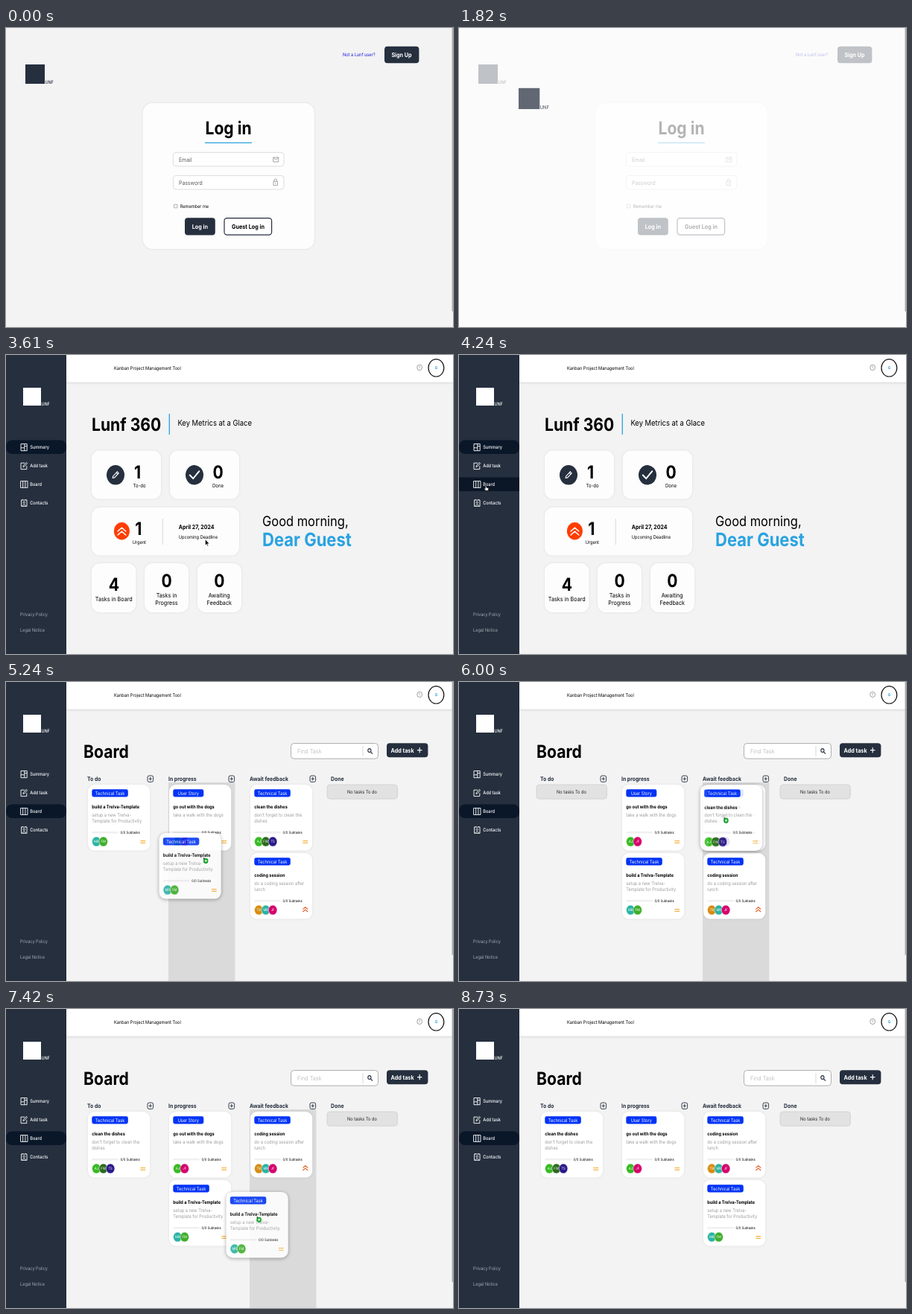
An HTML page that plays this animation: 600 by 402 pixels, repeating every 9.03 s.

```html
<!DOCTYPE html>
<html lang="en">
<head>
<meta charset="utf-8">
<title>Kanban demo</title>
<style>
  html, body { margin: 0; width: 100%; height: 100%; overflow: hidden; background: #f3f3f4; }
  svg { display: block; width: 100%; height: 100%; }
  text { font-family: Inter, Roboto, sans-serif; text-rendering: geometricPrecision; white-space: pre; }
  .card { filter: drop-shadow(0 0 1.5px rgba(0, 0, 0, .09)); }
  .ghost { filter: drop-shadow(0 1px 2.5px rgba(0, 0, 0, .38)); opacity: .88; }
</style>
</head>
<body>
<svg id="stage" viewBox="0 0 600 402" preserveAspectRatio="none"></svg>
<script>
const LOOP = 9030;
const SQUEEZE = 0.88;
const NAVY = '#252f3e', BLUE = '#29a3e0', BG = '#f3f3f4';

// --- drawing helpers ---
const each = (items, fn) => items.reduce((out, item, i) => out + fn(item, i), '');
const rect = (x, y, w, h, r, fill, extra = '') =>
  `<rect x="${x}" y="${y}" width="${w}" height="${h}" rx="${r}" fill="${fill}" ${extra}/>`;
const oval = (x, y, rx, ry, fill, extra = '') =>
  `<ellipse cx="${x}" cy="${y}" rx="${rx}" ry="${ry}" fill="${fill}" ${extra}/>`;
const line = (d, color, width = 1, extra = '') =>
  `<path d="${d}" fill="none" stroke="${color}" stroke-width="${width}" ${extra}/>`;
const text = (x, y, str, size, { fill = '#000', weight = 400, anchor = 'start' } = {}) =>
  `<text transform="translate(${x} ${y}) scale(${SQUEEZE} 1)" font-size="${size}" font-weight="${weight}" fill="${fill}" text-anchor="${anchor}">${str}</text>`;
const bold = (x, y, str, size, fill = '#000', anchor = 'start') =>
  text(x, y, str, size, { fill, weight: 700, anchor });
const mid = (x, y, str, size, fill = '#000') => text(x, y, str, size, { fill, anchor: 'middle' });
const group = (id, body) => `<g id="${id}">${body}</g>`;
const panel = (x, y, w, h, r) => rect(x, y, w, h, r, '#fdfdfd', 'class="card"');
const scrollbar = h => rect(598.6, 0, 1.4, h, 0, '#a9a9a9');

// --- login page ---
const logo = rect(26, 49, 26, 26, 0, NAVY) + text(52.4, 75.3, 'UNF', 6.2, { weight: 500, fill: NAVY });

const field = (y, label) =>
  rect(224.4, y, 148.6, 18.6, 4, '#fff', 'stroke="#d3d3d3" stroke-width=".8"') +
  text(232, y + 12.2, label, 7.8, { fill: '#5c5c5c' });

const login = rect(0, 0, 600, 402, 0, BG) + logo +
  text(452, 38.3, 'Not a Lunf user?', 6.35, { fill: '#1818d8' }) +
  rect(508, 24.8, 46.4, 22.4, 4, NAVY) + bold(531, 39, 'Sign Up', 8.2, '#fff', 'middle') +
  panel(183.8, 101, 230, 196, 13) +
  bold(298.5, 142.8, 'Log in', 24, '#000', 'middle') +
  line('M267 154.4H330', BLUE, 1.3) +
  field(167.3, 'Email') + field(198.4, 'Password') +
  line('M358.8 174h6.8v6h-6.8zl3.4 3.2 3.4-3.2', '#999', .9) +
  line('M359 206.2h5.4v5.4h-5.4zM360 206v-1.2a1.7 1.9 0 0 1 3.4 0v1.2M361.7 208.2v1.4', '#999', .9) +
  rect(225.5, 237.2, 4.4, 4.6, .6, '#fff', 'stroke="#777" stroke-width=".6"') +
  text(233.8, 241.9, 'Remember me', 6.35) +
  rect(240, 255.2, 40.8, 23.4, 4, NAVY) + bold(260.3, 270, 'Log in', 8.2, '#fff', 'middle') +
  rect(293, 255.7, 63.6, 22.4, 3.6, '#fff', `stroke="${NAVY}" stroke-width="1.2"`) +
  bold(325, 270, 'Guest Log in', 8.2, '#000', 'middle');

// --- sidebar and header ---
const NAV = [
  ['Summary', 124, 'M20 119.5h8.2v9.2H20zM24.8 119.5v9.2M20 124.8h4.8M24.8 122.6h3.4'],
  ['Add task', 149, 'M25 145.2h-5v8.4h7.8v-4.4M23 150.6l.3-1.8 4-4.4 1.2 1.3-4 4.4z'],
  ['Board', 174, 'M19.6 169.6h9.4v8.8h-9.4zM22.7 169.6v8.8M25.9 169.6v8.8'],
  ['Contacts', 199, 'M20.6 195h7.4v8.4h-7.4zM22 203.2c.4-2.6 4.2-2.6 4.6 0M24.3 197a1.2 1.3 0 1 1-.1 0M22 194v1M26.6 194v1'],
];
const shell = rect(0, 0, 81, 402, 0, NAVY) +
  rect(23, 44, 24, 24, 0, '#fff') + text(47.4, 68.3, 'UNF', 6.2, { weight: 500, fill: '#fff' }) +
  '<rect id="hover" width="81" height="18.6" fill="#0b1626"/>' +
  '<rect id="active" width="81" height="18.6" rx="8" fill="#091729"/>' +
  each(NAV, ([name, y, icon]) =>
    line(icon, '#fff', .9) + text(32.2, y + 2.3, name, 6.4, { fill: '#fff', weight: 500 })) +
  text(19, 350.6, 'Privacy Policy', 6.35, { fill: '#a5a9b0' }) +
  text(19, 371.6, 'Legal Notice', 6.35, { fill: '#a5a9b0' }) +
  rect(81, 0, 519, 36.6, 0, '#fff', 'style="filter:drop-shadow(0 1px 1.5px rgba(0,0,0,.13))"') +
  text(145, 19.8, 'Kanban Project Management Tool', 6.4) +
  oval(555.2, 16.8, 3.4, 3.7, 'none', 'stroke="#777" stroke-width=".7"') +
  mid(555.2, 18.8, '?', 5.4, '#777') +
  oval(577.4, 17.3, 10.4, 11.7, '#fff', 'stroke="#111" stroke-width="1.2"') +
  bold(577.4, 19.3, 'G', 5.4, BLUE, 'middle');

// --- summary page ---
const total = (x, y, n) => bold(x, y, n, 24, '#000', 'middle');
const PANELS = [[115, 128.5, 93, 65], [220, 128.5, 93, 65], [115, 205, 198, 64.5],
  [115, 280, 59.5, 66], [186, 280, 59, 66], [257, 280, 59, 66]];
const summary = bold(115, 101.5, 'Lunf 360', 24) +
  line('M219.3 79V107', BLUE, 1.3) +
  text(230.4, 95, 'Key Metrics at a Glace', 10.7) +
  each(PANELS, box => panel(...box, 11)) +
  oval(147, 161.3, 12, 13.2, NAVY) + line('M143.2 165.4l.5-2.5 5.6-6 1.9 2-5.6 6zM148 158.2l1.9 2', '#fff', 1.1) +
  oval(253, 161.3, 12, 13.2, NAVY) + line('M246.8 161.5l4.4 4.6 8-9.8', '#fff', 2, 'stroke-linecap="round"') +
  oval(155.4, 236.8, 10.5, 11.7, '#ff3d00') +
  line('M150 237l5.4-4.8 5.4 4.8M150 242l5.4-4.8 5.4 4.8', '#fff', 1.5, 'stroke-linecap="round"') +
  total(176.5, 166, '1') + text(170.6, 178.3, 'To-do', 6.8) +
  total(284.6, 166, '0') + text(277, 178.3, 'Done', 6.8) +
  total(177.8, 242, '1') + text(169.8, 254, 'Urgent', 6.4) +
  line('M210.3 220V255', '#d1d1d1', .8) +
  bold(231.8, 233.6, 'April 27, 2024', 8) + text(231.8, 247, 'Upcoming Deadline', 6.4) +
  total(145, 317, '4') + mid(144.8, 330.8, 'Tasks in Board', 8.2) +
  total(215.5, 312, '0') + mid(215.5, 326, 'Tasks in', 8.2) + mid(215.5, 335.6, 'Progress', 8.2) +
  total(286.3, 312, '0') + mid(286.3, 326, 'Awaiting', 8.2) + mid(286.3, 335.6, 'Feedback', 8.2) +
  text(344, 229.8, 'Good morning,', 18.7) + bold(344, 257, 'Dear Guest', 25, BLUE);

// --- board page ---
const COLUMNS = ['To do', 'In progress', 'Await feedback', 'Done'];
const LANE = 89.4;
const columnX = i => 109 + 109 * i;
const slot = ([col, row]) => [columnX(col) + 1, 138 + 92 * row];

const PEOPLE = { MR: '#2bb3a3', FM: '#3fae2a', AJ: '#36bb22', FW: '#2c6a1c', TS: '#2c1a8a', TB: '#d68c12', JF: '#d5006c' };
const CARDS = {
  template: ['Technical Task', 'build a Trelva-Template', ['setup a new Trelva-', 'Template for Productivity'], ['MR', 'FM']],
  dogs: ['User Story', 'go out with the dogs', ['take a walk with the dogs'], ['AJ', 'JF']],
  dishes: ['Technical Task', 'clean the dishes', ["don't forget to clean the", 'dishes'], ['AJ', 'FW', 'TS']],
  coding: ['Technical Task', 'coding session', ['do a coding session after', 'lunch'], ['TB', 'MR', 'JF'], true],
};
const CARD_IDS = Object.keys(CARDS);

function card([label, title, lines, people, urgent]) {
  const w = label === 'User Story' ? 41 : 48.5;
  return rect(0, 0, 83.2, 88.6, 9, '#fff') +
    rect(5.3, 6.3, w, 10.2, 2.4, '#0033f5') + mid(5.3 + w / 2, 13.7, label, 6.4, '#fff') +
    bold(5.3, 32.3, title, 6.35) +
    each(lines, (s, i) => text(5.3, 43.2 + 7.5 * i, s, 6.4, { fill: '#9b9b9b' })) +
    rect(5.3, 63, 35.5, 2.6, 1.3, '#f0f0f0') + text(43.6, 66, '0/0 Subtasks', 4.75) +
    each(people, (p, i) => oval(11.3 + 9.4 * i, 76.6, 5.8, 6.5, PEOPLE[p], 'stroke="#fff" stroke-width=".5"') +
      mid(11.3 + 9.4 * i, 78.4, p, 4.8, '#fff')) +
    (urgent ? line('M70.4 75.6l3.4-2.8 3.4 2.8M70.4 79l3.4-2.8 3.4 2.8', '#e5561c', 1.1)
            : line('M70.4 75.6h6.8M70.4 78.4h6.8', '#f5b443', 1.1));
}
const emptyBox = x => rect(x, 138, 94.4, 19.2, 4, '#e2e2e2', 'stroke="#cecece" stroke-width=".8"') +
  mid(x + 47, 150.3, 'No tasks To do', 6.4, '#222');
const addIcon = x => rect(x, 126, 7.6, 8.4, 2, 'none', `stroke="${NAVY}" stroke-width=".9"`) +
  line(`M${x + 1.7} 130.2h4.2m-2.1 -2.3v4.6`, NAVY, .9);

const board = bold(104, 101.5, 'Board', 24) +
  rect(382.5, 82.5, 117, 20.6, 4, '#fff', 'stroke="#a8a8a8" stroke-width=".9"') +
  text(391, 96, 'Find Task', 8.2, { fill: '#c2c2c2' }) +
  line('M479 86V100', '#cfcfcf', .8) +
  line('M490 92a2.1 2.4 0 1 1-4.2 0a2.1 2.4 0 1 1 4.2 0M489.5 93.8l2.5 2.8', NAVY, 1.1) +
  rect(511, 82.2, 55.4, 19, 4, NAVY) + bold(516.5, 94.7, 'Add task', 8.2, '#fff') +
  line('M552 91.6h6.4M555.2 88v7.2', '#fff', 1.1) +
  `<rect id="lane" y="135" width="${LANE}" height="267" fill="#dadada"/>` +
  each(COLUMNS, (name, i) => bold(columnX(i), 133, name, 7.8, NAVY) + (i < 3 ? addIcon(columnX(i) + 81) : '')) +
  emptyBox(431) + group('todoEmpty', emptyBox(104)) +
  each(CARD_IDS, id => `<use id="${id}" href="#${id}Art" class="card"/>`) +
  each(CARD_IDS, id => `<use id="${id}Ghost" href="#${id}Art" class="ghost"/>`) +
  scrollbar(367);

// --- pointers, tip at 0,0 ---
const arrow = '<path d="M0 0V8.2L1.9 6.5 3 9.2 4.2 8.7 3.1 6.1H5.5Z" fill="#000" stroke="#fff" stroke-width=".6"/>';
const POINTERS = {
  arrow,
  beam: line('M-1.4-3h1.1l.3.5.3-.5h1.1M0-2.6V2.6M-1.4 3h1.1l.3-.5.3.5h1.1', '#333', .8),
  hand: '<path d="M-.8 0q.8-.8 1.6 0v2.6l2.3.6q.8.4.6 1.4l-.6 2.4h-3.4L-2.6 3.8q.6-.8 1.8.4Z" fill="#fff" stroke="#000" stroke-width=".7"/>',
  copy: arrow + oval(3.2, 5.4, 3.2, 3.6, '#18a32c') + line('M1.5 5.4h3.4M3.2 3.5v3.8', '#fff', .9),
};

document.getElementById('stage').innerHTML =
  `<defs>${each(CARD_IDS, id => group(id + 'Art', card(CARDS[id])))}</defs>` +
  group('login', login + group('splash', rect(0, 0, 600, 402, 0, '#fff') + group('flyer', logo)) + scrollbar(381)) +
  group('app', rect(0, 0, 600, 402, 0, BG) + shell + group('summary', summary) + group('board', board)) +
  group('pointer', each(Object.keys(POINTERS), k => group('p-' + k, POINTERS[k])));

// --- timeline ---
const ENTER_APP = 3270, OPEN_BOARD = 4420;
const SPLASH = { show: 360, start: 1340, length: 1000, dx: 256, dy: 148, grow: 0.4 };

const PATH = [ // time, x, y
  [2390, 420, -12], [2760, 308, 218], [3030, 326, 266], [3380, 326, 266], [4180, 36, 175.5],
  [4480, 36, 175.5], [4840, 169.5, 170], [4920, 169.5, 170], [5240, 265, 235], [5500, 270, 247],
  [5860, 359.5, 180.5], [5960, 359.5, 180.5], [6450, 150.5, 194.5], [6620, 149, 197],
  [7060, 260, 262], [7160, 260, 262], [7560, 366, 284], [7850, 368, 286], [8670, 491, 17], [8730, 500, -12],
];
const POINTER_STEPS = [[0, 'arrow'], [2720, 'beam'], [2800, 'arrow'], [2940, 'hand'], [3300, 'arrow'],
  [4080, 'hand'], [4560, 'arrow'], [4960, 'copy'], [5500, 'arrow'], [6000, 'copy'], [6620, 'arrow'],
  [7200, 'copy'], [7720, 'arrow']];
const DRAGS = [
  { id: 'template', from: 4920, to: 5500 },
  { id: 'dishes', from: 5960, to: 6620 },
  { id: 'template', from: 7160, to: 7720 },
];
const HOMES = { // time, [column, row]
  template: [[0, [0, 0]], [5500, [1, 1]], [7720, [2, 1]]],
  dogs: [[0, [1, 0]]],
  dishes: [[0, [2, 0]], [6620, [0, 0]]],
  coding: [[0, [2, 1]], [6620, [2, 0]]],
};

const el = id => document.getElementById(id);
const show = (id, on) => { el(id).style.display = on ? '' : 'none'; };
const place = (id, x, y) => el(id).setAttribute('transform', `translate(${x} ${y})`);
const stepAt = (steps, t) => steps.filter(s => s[0] <= t).pop()[1];
const clamp = v => Math.min(1, Math.max(0, v));

function bezier(x1, y1, x2, y2) {
  const curve = (a, b, s) => 3 * a * s * (1 - s) ** 2 + 3 * b * s * s * (1 - s) + s ** 3;
  return x => {
    let lo = 0, hi = 1;
    for (let i = 0; i < 24; i++) {
      const m = (lo + hi) / 2;
      if (curve(x1, x2, m) < x) lo = m; else hi = m;
    }
    return curve(y1, y2, lo);
  };
}
const ease = bezier(.25, .1, .25, 1), easeIn = bezier(.42, 0, 1, 1);

function pointerAt(t) {
  const i = PATH.findIndex(p => p[0] > t);
  if (i < 1) return null;
  const [t0, x0, y0] = PATH[i - 1], [t1, x1, y1] = PATH[i];
  const u = (t - t0) / (t1 - t0), k = u * u * (3 - 2 * u);
  return [x0 + (x1 - x0) * k, y0 + (y1 - y0) * k];
}

function drawLogin(t) {
  show('splash', t >= SPLASH.show && t < SPLASH.start + SPLASH.length);
  const p = clamp((t - SPLASH.start) / SPLASH.length), left = 1 - ease(p);
  el('splash').setAttribute('opacity', 1 - easeIn(p));
  el('flyer').setAttribute('transform',
    `translate(${44 + SPLASH.dx * left} ${53 + SPLASH.dy * left}) scale(${1 + SPLASH.grow * left}) translate(-44 -53)`);
}

function drawNav(t, pos) {
  const active = t < OPEN_BOARD ? 0 : 2;
  const over = pos && pos[0] < 81 ? NAV.findIndex(n => Math.abs(n[1] - pos[1]) < 9.3) : -1;
  place('active', 0, NAV[active][1] - 9.5);
  show('hover', over >= 0 && over !== active);
  if (over >= 0) place('hover', 0, NAV[over][1] - 9.5);
}

function drawBoard(t, pos) {
  const drag = DRAGS.find(d => t >= d.from && t < d.to);
  for (const id of CARD_IDS) {
    const [x, y] = slot(stepAt(HOMES[id], t));
    const held = drag && drag.id === id;
    place(id, x, y);
    show(id + 'Ghost', held);
    if (held) {
      const grab = pointerAt(drag.from);
      place(id + 'Ghost', x + pos[0] - grab[0], y + pos[1] - grab[1]);
    }
  }
  const lane = drag ? [0, 1, 2].find(i => pos[0] >= columnX(i) && pos[0] < columnX(i) + LANE) : undefined;
  show('lane', lane !== undefined);
  if (lane !== undefined) el('lane').setAttribute('x', columnX(lane));
  show('todoEmpty', t >= 5500 && t < 6620);
}

function draw(t) {
  const inApp = t >= ENTER_APP, onBoard = t >= OPEN_BOARD, pos = pointerAt(t);
  show('login', !inApp);
  show('app', inApp);
  show('summary', !onBoard);
  show('board', onBoard);
  drawLogin(t);
  drawNav(t, pos);
  drawBoard(t, pos);
  show('pointer', pos);
  if (pos) place('pointer', ...pos);
  const kind = stepAt(POINTER_STEPS, t);
  for (const k in POINTERS) show('p-' + k, k === kind);
}

const start = performance.now();
function tick() {
  draw((performance.now() - start) % LOOP);
  requestAnimationFrame(tick);
}
tick();
</script>
</body>
</html>
```
